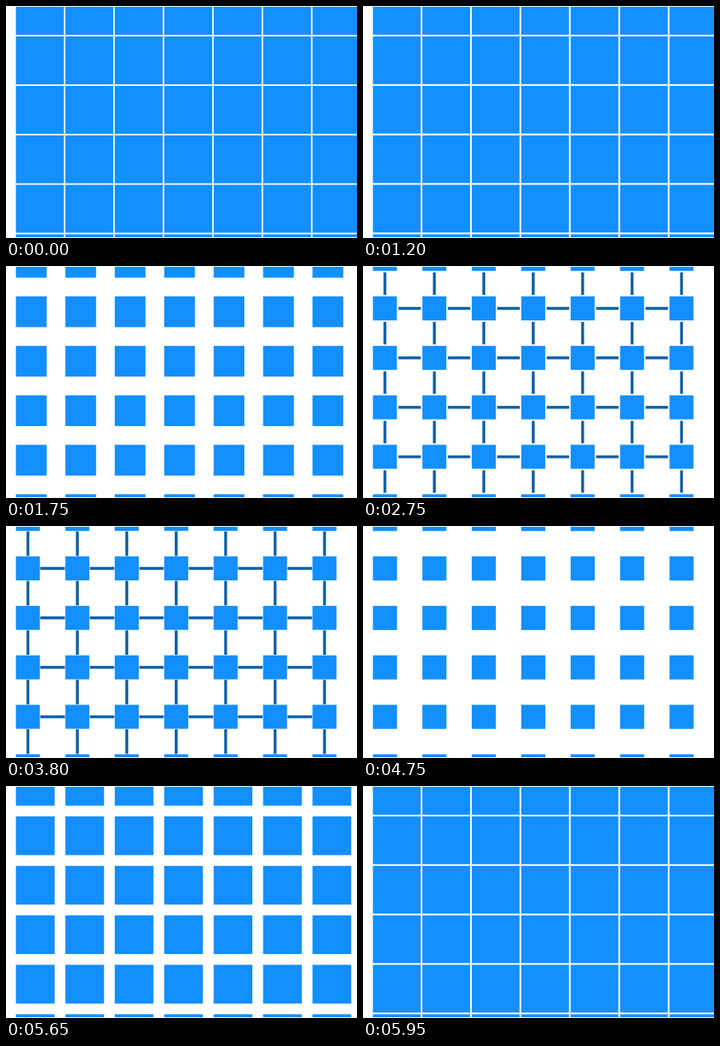
These frames come from a looping animation (439x290 px, 6 s). An HTML page with a canvas:

```html
<!DOCTYPE html>
<html lang="en">
<head>
<meta charset="utf-8">
<title>Grid</title>
<style>
  html, body { margin: 0; width: 100%; height: 100%; overflow: hidden; background: #fff; }
  canvas { display: block; }
</style>
</head>
<body>
<canvas id="stage" width="439" height="290"></canvas>
<script>
const ctx = document.getElementById('stage').getContext('2d');
const LOOP = 6000, TURN = 3575;       // motion is mirrored around TURN
const COLS = 7, ROWS = 6, PITCH = 61.83;
const LEFT = 12.4, TOP = 38 - PITCH;
const BIG = 60, SMALL = 30, BAR = 30.6, THICK = 3.6;

// cubic-bezier(.25, .1, .25, 1)
function ease(x) {
  if (x <= 0) return 0;
  if (x >= 1) return 1;
  const curve = (s, a, b) => 3 * a * s * (1 - s) ** 2 + 3 * b * s * s * (1 - s) + s ** 3;
  let lo = 0, hi = 1;
  for (let i = 0; i < 24; i++) {
    const mid = (lo + hi) / 2;
    if (curve(mid, 0.25, 0.25) < x) lo = mid; else hi = mid;
  }
  return curve(lo, 0.1, 1);
}

const phase = (t, start, length) => ease((t - start) / length);

function bar(cx, cy, w, h) {
  ctx.fillRect(cx - w / 2, cy - h / 2, w, h);
}

function draw(time) {
  const t = time > TURN ? 2 * TURN - time : time;
  const size = BIG + (SMALL - BIG) * phase(t, 1175, 1350);
  const reach = BAR * phase(t, 2525, 345);

  ctx.fillStyle = '#fff';
  ctx.fillRect(0, 0, 439, 290);
  ctx.save();
  ctx.beginPath();
  ctx.rect(0, 1, 439, 288);
  ctx.clip();

  for (let row = 0; row < ROWS; row++) {
    for (let col = 0; col < COLS; col++) {
      const x = LEFT + col * PITCH, y = TOP + row * PITCH;
      ctx.fillStyle = '#138fff';
      ctx.fillRect(x, y, size, size);
      if (reach <= 0) continue;
      const cx = x + SMALL / 2, cy = y + SMALL / 2;
      ctx.fillStyle = '#0f60a6';
      if (col < COLS - 1) bar(cx + PITCH / 2, cy, reach, THICK);
      if (row < ROWS - 1) bar(cx, cy + PITCH / 2, THICK, reach);
    }
  }
  ctx.restore();
}

const begin = performance.now();
function tick() {
  draw((performance.now() - begin) % LOOP);
  requestAnimationFrame(tick);
}
tick();
</script>
</body>
</html>
```
